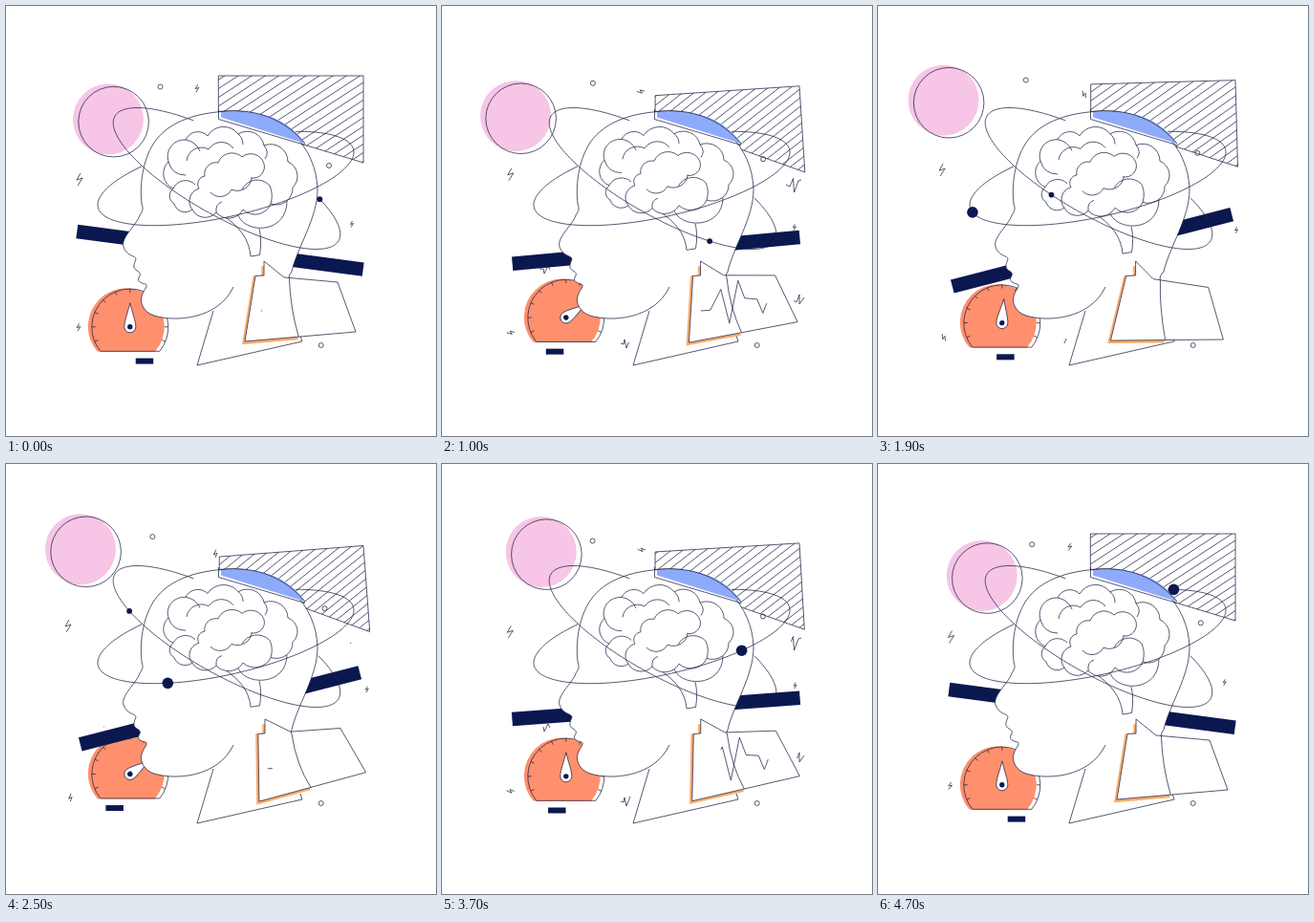
Animation, 450 px wide and 450 px high, one loop 4.8 s. Source, as an HTML page:

```html
<!DOCTYPE html>
<html lang="en">
<head>
<meta charset="utf-8">
<title>Mind diagram</title>
<style>
  html, body { margin: 0; width: 100%; height: 100%; overflow: hidden; background: #fff; }
  svg { display: block; width: 100vw; height: 100vh; }
  .line { fill: none; stroke: #1f2044; stroke-width: .75; stroke-linejoin: round; }
  .solid { fill: #fff; }
  .navy { fill: #0b1850; }
</style>
</head>
<body>
<svg viewBox="0 0 450 450">
  <defs><clipPath id="panelClip"><path id="panelClipPath"/></clipPath></defs>

  <circle id="pinkFill" r="37" fill="#f7c5e5"/>
  <circle id="pinkRing" r="36.8" class="line"/>

  <g clip-path="url(#panelClip)"><path id="hatch" class="line"/></g>
  <path id="panel" class="line"/>

  <g id="gauge">
    <path d="M-34 26A40 40 0 1 1 26 26Z" fill="#ff906d"/>
    <path class="line" d="M-31 25.5A40 40 0 1 1 31 25.5Z"/>
    <path id="ticks" class="line"/>
    <g id="needle">
      <path class="line solid" d="M0 -25C2 -16 6 -6 6 0A6 6 0 0 1 -6 0C-6 -6 -2 -16 0 -25Z"/>
      <circle r="2.7" class="navy"/>
    </g>
  </g>
  <rect id="base" width="18.5" height="6" class="navy"/>

  <g id="zigs"></g>
  <rect id="bar" x="-151" y="-7.3" width="302" height="14.6" class="navy"/>

  <path class="line solid" d="M299 278C305 252 326 222 326 192C325 148 290 111 240 110C205 110 171 119 155 143C142 163 140 189 142 207C144 213 143 214 140 219C137 229 120 242 123 252C126 262 136 261 136 265C134 270 132 274 137 277C141 279 141 281 139 284C137 288 141 290 146 291C149 293 145 296 143 301C139 309 143 320 155 324C177 331 222 328 238 294"/>
  <path d="M225 111C268 107 296 119 313 144L225 116.5Z" fill="#8eabfb"/>
  <path class="line" d="M222.5 108V118.5L313 145.5M222.5 110.5C262 106 292 119 313 144"/>
  <path class="line" d="M217 319L200 376L310 351L308 345"/>

  <g id="brain" class="line">
    <path d="M225 218Q254 236 256 262L265.5 260.5Q268 245 265 233"/>
    <path d="M242 216C247 239 294 240 294 204"/>
  </g>

  <path id="cardShade" fill="none" stroke="#ffac68" stroke-width="3.4"/>
  <path id="card" class="line solid"/>
  <path id="fold" class="line"/>
  <path id="pulse" class="line" pathLength="1"/>

  <path id="orbitA" class="line"/>
  <path id="orbitB" class="line"/>
  <circle id="dotA" r="2.9" class="navy"/>
  <circle id="dotB" r="5.8" class="navy"/>
  <g id="drifters"></g>
</svg>
<script>
const LOOP = 4800, DEG = Math.PI / 180;
const $ = id => document.getElementById(id);
const set = (el, attrs) => { for (const k in attrs) el.setAttribute(k, attrs[k]); };
const make = (parent, tag, attrs) => {
  const el = document.createElementNS('http://www.w3.org/2000/svg', tag);
  set(el, attrs);
  return parent.appendChild(el);
};
const poly = pts => 'M' + pts.map(p => p.map(v => v.toFixed(2)).join(' ')).join('L');
const clamp = x => Math.min(1, Math.max(0, x));
const ease = x => { x = clamp(x); return x * x * (3 - 2 * x); };
const mix = (a, b, k) => a + (b - a) * k;
const turn = t => 2 * Math.PI * t / LOOP;

// A loop-long oscillation: mean, cosine, sine and double-speed cosine.
const wave = (t, mean, c, s, c2) =>
  mean + c * Math.cos(turn(t)) + s * Math.sin(turn(t)) + c2 * Math.cos(2 * turn(t));

const sway = t => clamp(.5 - .53 * Math.cos(2 * Math.PI * (t + 30) / 1600));
const cardTilt = t => sway(t) - .88 * Math.sin(Math.PI * clamp(t / 2500) ** 1.8) ** 2;

// The needle eases from one turning point to the next.
const swings = [[0, 0], [950, 57], [1700, -5], [2500, 55], [3280, -75], [4100, 70], [4700, 0], [LOOP, 0]];
const needleAngle = t => {
  const i = swings.findIndex(([end]) => t < end);
  const [t0, a0] = swings[i - 1], [t1, a1] = swings[i];
  return mix(a0, a1, ease((t - t0) / (t1 - t0)));
};

// Orbits and the dots that run along them.
const ellipse = (cx, rx, ry, phase) => deg =>
  [cx + rx * Math.cos(deg * DEG), 180.5 + ry * Math.cos((deg - phase) * DEG)];
const orbits = [
  { name: 'A', at: ellipse(231, 118.8, 74, 38), from: -36, to: 253,
    angle: t => -35 + 360 * t / LOOP + wave(t, 12.5, 2, 0, -14.5) },
  { name: 'B', at: ellipse(230, 134, 49.2, 124), from: -57, to: 229,
    angle: t => -62 - 360 * t / LOOP + wave(t, 15.6, -2.8, -3.3, -12.8) }
];
for (const { name, at, from, to } of orbits) {
  set($('orbit' + name), { d: poly(Array.from({ length: 121 }, (_, i) => at(mix(from, to, i / 120)))) });
}

const ray = (deg, r) => [r * Math.sin(deg * DEG), -r * Math.cos(deg * DEG)];
let ticks = '';
for (let deg = -112.5; deg <= 112.5; deg += 22.5) ticks += poly([ray(deg, 36), ray(deg, 40)]);
set($('ticks'), { d: ticks });

// Cloud edge: a rounded bump between each pair of neighbouring points.
function bumps(text, sweep = 1) {
  const pts = text.split(' ').map(p => p.split(',').map(Number));
  return `M${pts[0]}` + pts.slice(1).map(([x, y], i) => {
    const r = .6 * Math.hypot(x - pts[i][0], y - pts[i][1]);
    return `A${r} ${r} 0 0 ${sweep} ${x} ${y}`;
  }).join('');
}
const folds = [
  bumps('176,207 175,191 170,163 188,140 211,136 243,134 270,146 295,163 300,190 277,207 248,213 220,216 195,213 176,207'),
  bumps('195,213 202,191 208,178 222,164 247,158 270,165 257,180'),
  bumps('214,195 236,192 257,179', 0),
  bumps('189,162 212,150 238,149') + bumps('175,191 198,187') + bumps('247,192 276,188'),
  'M188 140Q199 142 203 152M243 134Q248 138 248 145M276 188Q280 197 277 207M170 163Q174 177 188 177M270 146Q276 153 271 160M220 216Q219 207 226 205'
];
folds.forEach((d, i) => make($('brain'), 'path', { d, class: i ? '' : 'solid' }));

// Small bolts and rings: start, end, size and turn over the drift.
const bolts = [
  [77, 181, 64.5, 168.5, 1, 0],
  [200, 86, 220, 94.5, .62, 180],
  [362, 228, 378.5, 236, .5, 0],
  [76, 336, 67, 350, .62, 180]
].map(b => [make($('drifters'), 'path', {
  class: 'line', d: 'M1-6L-3 1L3-1L-2 7', 'vector-effect': 'non-scaling-stroke'
}), ...b]);
const rings = [
  [161.5, 84.5, 153, 75.7], [338, 167, 333.4, 150.5], [329.7, 355, 329.7, 355]
].map(r => [make($('drifters'), 'circle', { class: 'line', r: 2.5 }), ...r]);

// Short traces, each with the delay of its drawing.
const zigs = [
  ['M360 187L364 189L367.5 180.5L368.5 195L373 183L376 182', 0],
  ['M368 308L371 310L374 302L374 312L379 305', 0],
  ['M187 353L190 354L191 349L193 358L197 348', 250],
  ['M102 275L106 275L107 280L111 272L113 276', 0]
].map(([d, delay]) => [make($('zigs'), 'path', { class: 'line', d, pathLength: 1 }), delay]);

function drawPanel(m) {
  const d = poly([[222.3 + m, 73 + 25 * m], [374, 73 + 13 * m], [374 + 7 * m, 164 + 12 * m], [222.3 + m, 118]]) + 'Z';
  set($('panel'), { d });
  set($('panelClipPath'), { d });
  const rise = 175 * Math.tan((33 + 6 * m) * DEG);
  let lines = '';
  for (let y = 82 + 12 * m; y < 320; y += 9.2) lines += poly([[215, y], [390, y - rise]]);
  set($('hatch'), { d: lines });
}

function drawCard(p) {
  const inner = [270 + p, 282], left = [261 + 3 * p, 282.5];
  const low = [250 + 15.5 * p, 351 + 2.2 * p], far = [366 + 11 * p, 341 - 19 * p];
  const top = [347 + 3 * p, 289 - 13 * p], dip = [291 + 7 * p, 284 - 4 * p];
  const end = [0, 1].map(k => mix(low[k], far[k], .485));
  set($('card'), { d: poly([[270 + p, 267], inner, left, low, far, top, dip]) + 'Z' });
  set($('cardShade'), { d: poly([[270 + p, 271], inner, left, low, end].map(([x, y]) => [x - 1, y + 1.3])) });
  const neck = [296.5 + 2.5 * p, 286 - 4 * p];
  set($('fold'), { d: `M299 278Q${neck[0] - 1.5} 282 ${neck}Q${297.5 + 7 * p} 316 ${end}` });
  const beat = [[267, 319], [277, 319], [288, 298], [297, 334], [306, 290], [313, 309], [326, 311], [332, 326], [336, 316]];
  set($('pulse'), { d: poly(beat.map(([x, y]) => [x + 7 * p, y - (x - 267) * .13 * p])) });
}

// Draws a trace on from its start, then wipes it away from its start.
function drawTrace(el, c, least = 0) {
  const trail = ease((c - 1090) / 780);
  const shown = Math.max(least, ease(c / 980)) - trail;
  set(el, {
    'stroke-dasharray': `${Math.max(0, shown)} 2`, 'stroke-dashoffset': -trail,
    visibility: shown > .001 ? 'visible' : 'hidden'
  });
}

function render(t) {
  const m = sway(t), drift = 1 - Math.abs(1 - t / 2400), cycle = t % 2400;

  const x = wave(t, 89.25, 15.5, -14.8, 2.25), y = wave(t, 102.7, 14, 10.8, 1.85);
  set($('pinkFill'), { cx: x, cy: y });
  set($('pinkRing'), { cx: x + 5.6, cy: y + 2.6 });

  set($('bar'), { transform: `translate(224 255.8) rotate(${wave(t, -5.3, 11.07, -1.35, 1.77)})` });
  drawPanel(m);
  drawCard(cardTilt(t));
  set($('brain'), { transform: `translate(0 128) scale(1 ${1 - .06 * m}) translate(0 -128)` });

  set($('gauge'), { transform: `translate(129.8 ${335.8 - 11.8 * m})` });
  set($('needle'), { transform: `rotate(${needleAngle(t)})` });
  set($('base'), { x: 135.7 - 32.5 * m, y: 368.6 - 12 * m });

  drawTrace($('pulse'), cycle, .006);
  for (const [el, delay] of zigs) drawTrace(el, cycle - delay);

  for (const { name, at, from, to, angle } of orbits) {
    const deg = angle(t), [cx, cy] = at(deg);
    const along = ((deg - from) % 360 + 360) % 360;
    set($('dot' + name), { cx, cy, visibility: along <= to - from ? 'visible' : 'hidden' });
  }
  for (const [el, x0, y0, x1, y1, size, spin] of bolts) {
    set(el, { transform: `translate(${mix(x0, x1, drift)} ${mix(y0, y1, drift)}) rotate(${spin * drift}) scale(${size})` });
  }
  for (const [el, x0, y0, x1, y1] of rings) {
    set(el, { cx: mix(x0, x1, drift), cy: mix(y0, y1, drift) });
  }
}

const begin = performance.now();
function tick() {
  const t = (performance.now() - begin) % LOOP;
  render(Math.floor(t / 100) * 100);
  requestAnimationFrame(tick);
}
tick();
</script>
</body>
</html>
```
